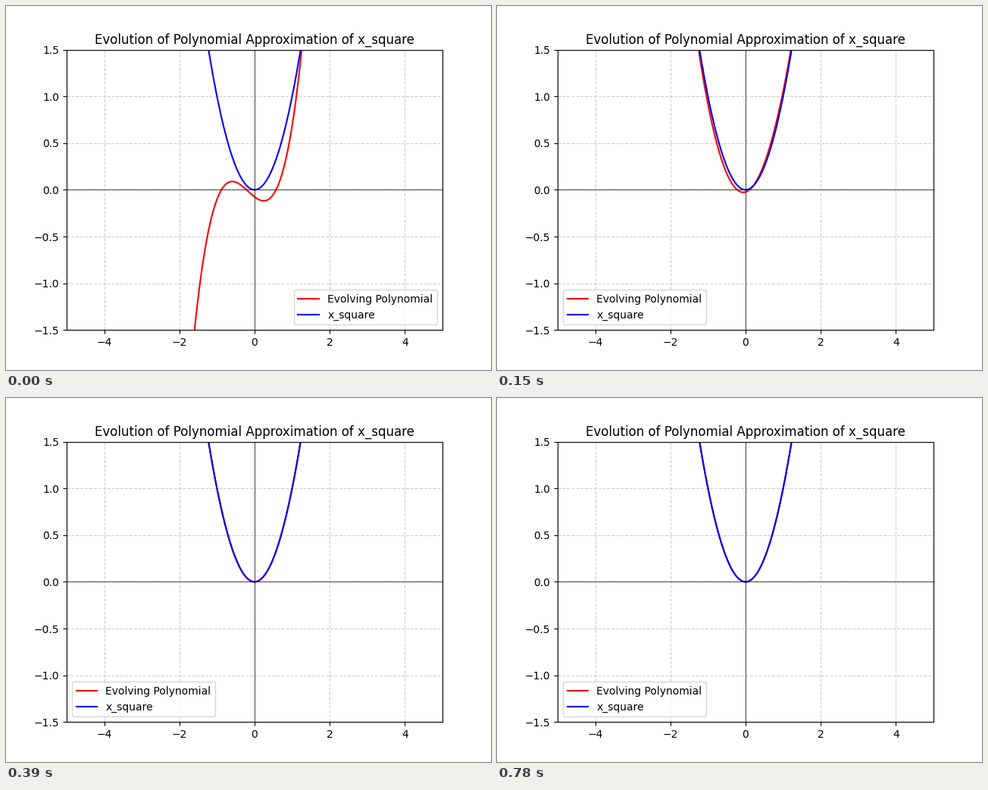
Write a matplotlib script that moves like this. It is 640 by 480 pixels and loops after 1.5 s.

```python
import numpy as np
import matplotlib.pyplot as plt
from matplotlib.animation import FuncAnimation

FRAMES, INTERVAL = 50, 30
DECAY = 0.68

# Coefficients c3, c2, c1, c0 of the red cubic at a few early steps.
KEY_STEPS = [0, 1, 2, 3, 5]
START = np.array([0.700, 0.3675, -0.306, -0.0754])
SWUNG = np.array([-0.144, 0.9976, 0.352, -0.0157])
CLOSE = np.array([-0.052, 1.008, 0.1215, -0.0234])
SQUARE = np.array([0.0, 1.0, 0.0, 0.0])
KEYS = np.array([START + w * (SWUNG - START) for w in (0, 0.72, 0.92, 1)] + [CLOSE])


def coefficients(step):
    """Swing past the target, then settle on it geometrically."""
    if step <= KEY_STEPS[-1]:
        return [np.interp(step, KEY_STEPS, column) for column in KEYS.T]
    return SQUARE + (CLOSE - SQUARE) * DECAY ** (step - KEY_STEPS[-1])


x = np.linspace(-5, 5, 1000)
fig, ax = plt.subplots(figsize=(6.4, 4.8), dpi=100)
evolving, = ax.plot(x, np.polyval(START, x), color="red", label="Evolving Polynomial")
ax.plot(x, x**2, color="blue", label="x_square")
ax.axhline(0, color="black", linewidth=0.5)
ax.axvline(0, color="black", linewidth=0.5)
ax.set(xlim=(-5, 5), ylim=(-1.5, 1.5),
       title="Evolution of Polynomial Approximation of x_square")
ax.grid(True, linestyle="--", alpha=0.6)
legend = ax.legend(loc="lower right")


def update(step):
    evolving.set_ydata(np.polyval(coefficients(step), x))
    legend.set_loc("lower right" if step == 0 else "lower left")
    return evolving, legend


anim = FuncAnimation(fig, update, frames=FRAMES, interval=INTERVAL,
                     repeat=True, repeat_delay=0)
plt.show()
```
